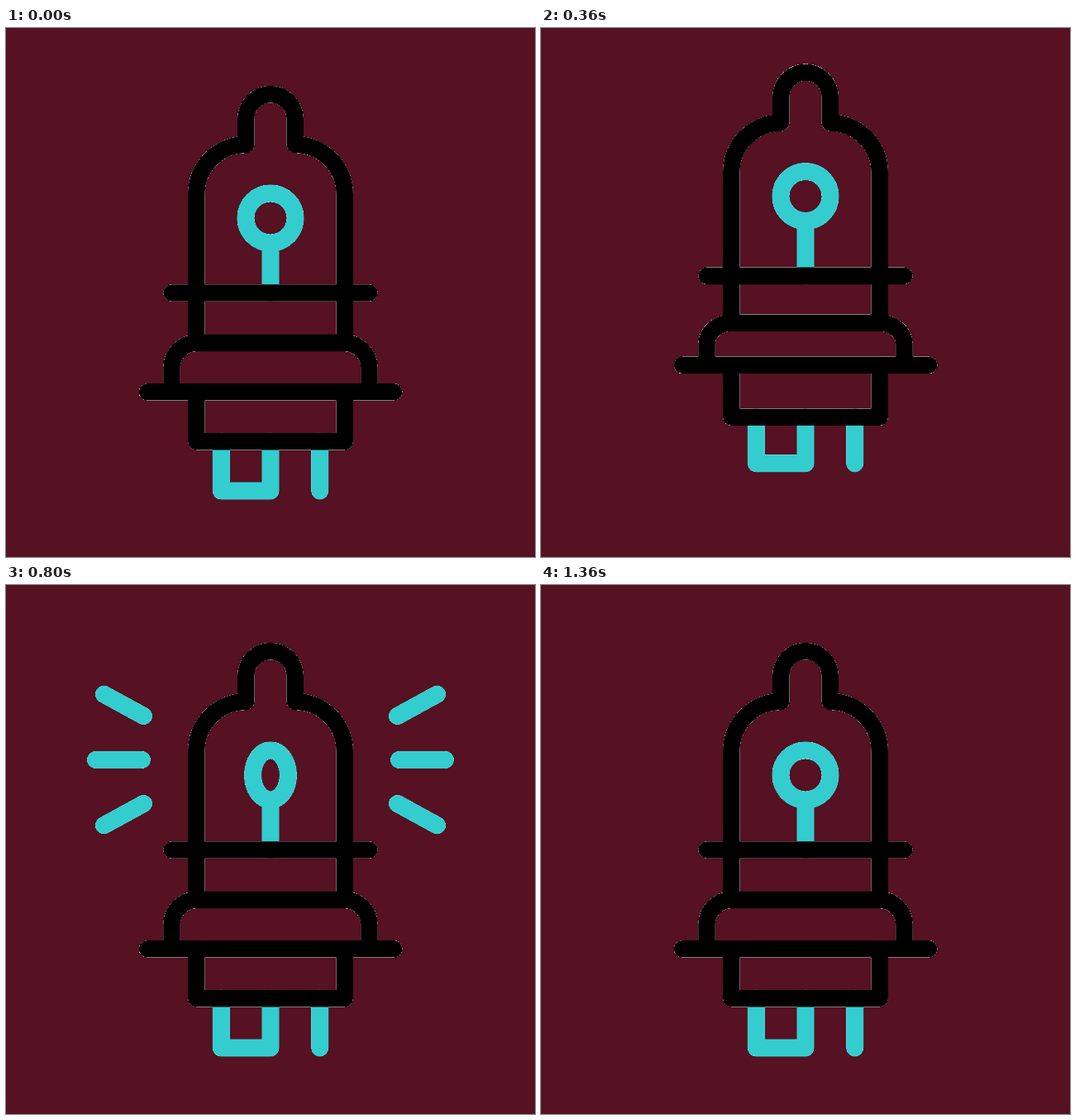
These frames come from a looping animation (640x640 px, 1480 ms). An HTML page:

```html
<!DOCTYPE html>
<html lang="en">
<head>
<meta charset="utf-8">
<title>Glowing tube</title>
<style>
  html, body { margin: 0; width: 100%; height: 100%; overflow: hidden; background: #561122; }
  svg { display: block; width: 100vw; height: 100vh; }
  path { fill: none; stroke-linecap: round; stroke-linejoin: round; }
  .edge { stroke: #fff; stroke-width: 20.8; shape-rendering: crispEdges; }
  .lit { stroke: #33cdcf; stroke-width: 21; }
  .body { stroke: #000; stroke-width: 20.6; }
</style>
</head>
<body>
<svg viewBox="0 0 640 640">
  <defs>
    <path id="rays"/>
    <path id="filament"/>
    <path id="pins"/>
    <path id="shell"/>
  </defs>
  <!-- hard pale edge under the smooth lines -->
  <g class="edge">
    <use href="#rays"/><use href="#filament"/><use href="#pins"/><use href="#shell"/>
  </g>
  <g class="lit">
    <use href="#rays"/><use href="#filament"/><use href="#pins"/>
  </g>
  <use class="body" href="#shell"/>
</svg>
<script>
const LOOP = 1480, STEP = 40;

// Height at rest, offset at the top of the jump, offset when squashed
const parts = {
  tip:      [110, -62.5, 40],
  bar:      [320.5, -54.7, 42],
  shoulder: [381, -48, 19.5],
  flange:   [440.3, -67.5, 32],
  base:     [500.2, -56, 19.5],
  foot:     [560, -51.3, 0]
};

// Inner and outer end of each ray on the left; the right side mirrors them
const rays = [
  [166.5, 158.5, 70.5, 106],
  [164.5, 211.5, 52.5, 211.5],
  [166.5, 264.5, 70.5, 317]
];

const draw = (id, d) => document.getElementById(id).setAttribute('d', d);
const mix = (a, b, k) => a + (b - a) * k;

function ease(t, from, to) {
  const p = Math.min(1, Math.max(0, (t - from) / (to - from)));
  return p * p * (3 - 2 * p);
}

function height([rest, jump, squash], t) {
  const up = mix(0, jump, ease(t, 80, 280));
  const down = mix(up, squash, ease(t, 280, 480));
  return rest + mix(down, 0, ease(t, 480, 640));
}

function shellPath(y) {
  const neck = y.tip + 31, ry = (y.flange - y.shoulder) / 2;
  return `M230.3 ${y.shoulder}V${neck + 60}A60 60 0 0 1 290.3 ${neck}V${y.tip}
    A29.7 29.9 0 0 1 349.7 ${y.tip}V${neck}A60 60 0 0 1 409.7 ${neck + 60}V${y.shoulder}
    M200.5 ${y.bar}H439.5
    M200.5 ${y.flange}V${y.shoulder + ry}A30 ${ry} 0 0 1 230.5 ${y.shoulder}
    H409.5A30 ${ry} 0 0 1 439.5 ${y.shoulder + ry}V${y.flange}
    M171 ${y.flange}H469.3
    M230.3 ${y.flange}V${y.base}H409.7V${y.flange}`;
}

function filamentPath(y, t) {
  const cy = y.tip + 120, r = 30, k = r * 0.5523;
  const rx = r * (1 - ease(t, 680, 1020) + ease(t, 1020, 1360));
  const kx = rx * 0.5523;
  const half = s => `C${320 + s * kx} ${cy - r} ${320 + s * rx} ${cy - k} ${320 + s * rx} ${cy}
    S${320 + s * kx} ${cy + r} 320 ${cy + r}`;
  const top = `M320 ${cy - r}`;
  return `${top}${half(1)}${top}${half(-1)}V${y.bar}`;
}

function rayPath(t) {
  const head = ease(t, 560, 1040), tail = ease(t, 840, 1320);
  if (head <= tail) return '';
  return rays.map(([x0, y0, x1, y1]) => {
    const a = mix(x0, x1, tail), b = mix(x0, x1, head);
    const ya = mix(y0, y1, tail), yb = mix(y0, y1, head);
    return `M${a} ${ya}L${b} ${yb}M${640 - a} ${ya}L${640 - b} ${yb}`;
  }).join('');
}

function render(t) {
  const y = {};
  for (const name in parts) y[name] = height(parts[name], t);
  draw('shell', shellPath(y));
  draw('filament', filamentPath(y, t));
  draw('pins', `M260.4 ${y.base}V${y.foot}H320V${y.base}M379.7 ${y.base}V${y.foot}`);
  draw('rays', rayPath(t));
}

const start = performance.now();
function tick() {
  const t = (performance.now() - start) % LOOP;
  render(Math.floor(t / STEP) * STEP);
  requestAnimationFrame(tick);
}
tick();
</script>
</body>
</html>
```
